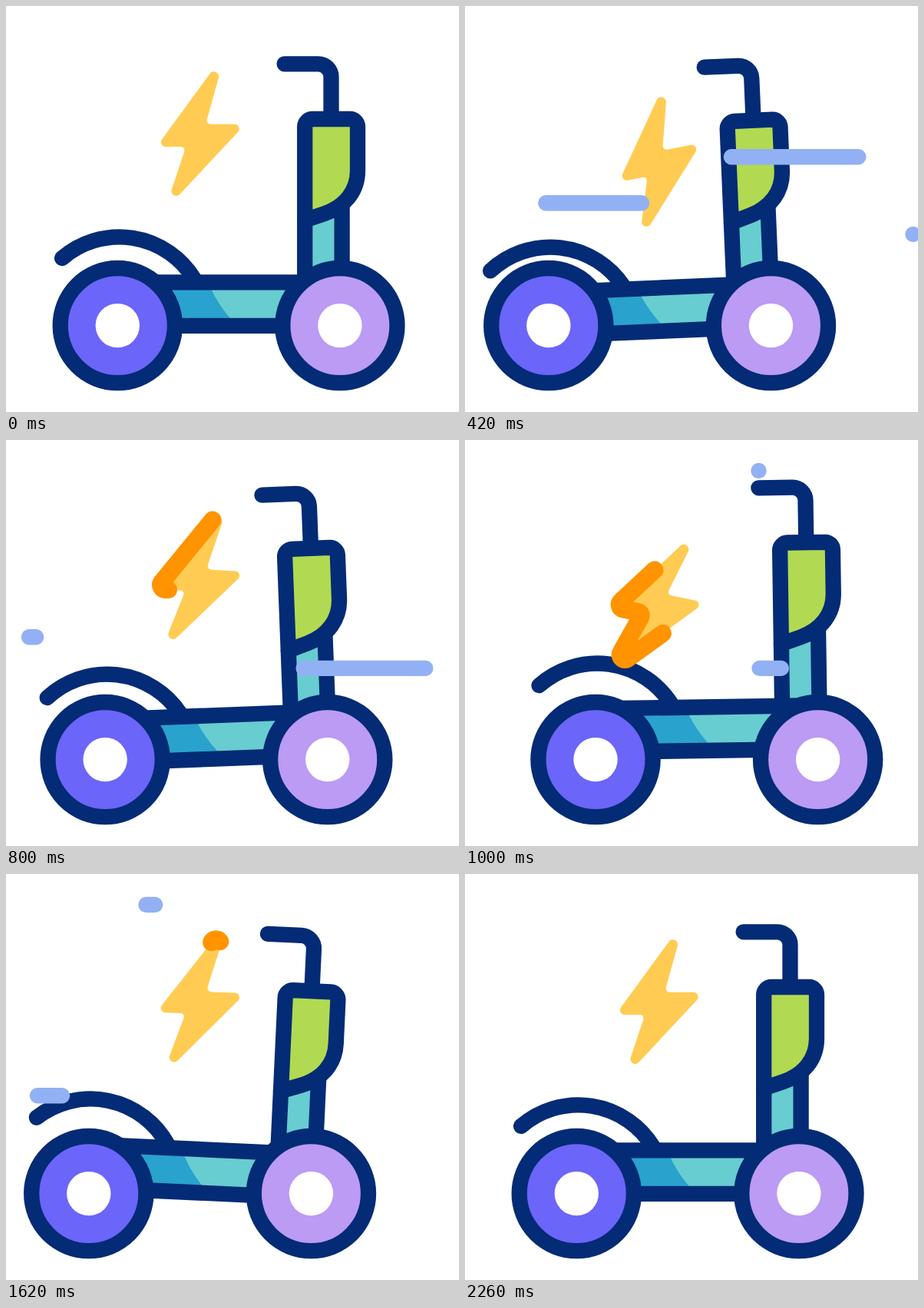
An HTML page for the animation above (2.4 s loop, 590 by 528 pixels).

```html
<!DOCTYPE html>
<html lang="en">
<head>
<meta charset="utf-8">
<title>Electric scooter</title>
<style>
  html, body { margin: 0; width: 100%; height: 100%; overflow: hidden; background: #fff; }
  svg { display: block; width: 590px; height: 528px; }
  .line { fill: none; stroke: #042b75; stroke-width: 20.3; stroke-linejoin: round; }
  .cap { stroke-linecap: round; }
  .streak { fill: none; stroke: #92b0f4; stroke-width: 20.4; stroke-linecap: round; }
</style>
</head>
<body>
<svg viewBox="0 0 590 528">
  <g id="body">
    <path fill="#67cdd0" d="M160 359H435V416H160ZM389 262H438V360H389Z"/>
    <path fill="#29a2ce" d="M160 359H263.5Q273 386 300.5 416H160Z"/>
    <path class="line" d="M160 359.3H435V415.8H160Z"/>
    <path class="line cap" d="M73 328A114.4 114.4 0 0 1 245.1 355"/>
    <path class="line" d="M389.2 278V358M437.6 258V400"/>
    <path class="line cap" d="M362.6 75.3H406.5A17 17 0 0 1 423.5 92.3V147"/>
    <path class="line" style="fill:#b1da52" d="M389.2 278.6V157A10 10 0 0 1 399.2 147H448A10 10 0 0 1 458 157V214C458 241 441 261 415 270Z"/>
  </g>
  <g id="wheels">
    <g transform="translate(145.3 415.6)">
      <circle class="line" r="74.6" style="fill:#6b65f9"/>
      <circle r="28.7" fill="#fff"/>
    </g>
    <g transform="translate(434.9 415.6)">
      <circle class="line" r="74.6" style="fill:#bb9bf3"/>
      <circle r="28.7" fill="#fff"/>
    </g>
  </g>
  <g id="bolt">
    <path id="flash" fill="#ffcb52"/>
    <path id="glow" fill="none" stroke="#ff9300" stroke-width="23" stroke-linecap="round" stroke-linejoin="round" pathLength="1"/>
  </g>
  <g id="streaks"></g>
</svg>
<script>
const LOOP = 2400, STEP = 20, BEAT = 323;
const STREAK = { length: 200, run: 410, delay: 262 };
const $ = id => document.getElementById(id);

const outline = 'M264.6 89.2L203.1 173.6A6 6 0 0 0 208 183H227' +
  'Q234 183 232 190L216 238A6.3 6.3 0 0 0 226.6 244.6' +
  'L302 163.9A6 6 0 0 0 297.6 153.8H268Q260 153.8 262.2 146' +
  'L276.6 94.2A6.5 6.5 0 0 0 264.6 89.2';
$('flash').setAttribute('d', outline + 'Z');
$('glow').setAttribute('d', outline);

function ease(u) {
  u = Math.min(1, Math.max(0, u));
  return u * u * (3 - 2 * u);
}

// Eases from each value to the next; without times, one value per beat.
function track(values, times = values.map((_, i) => i * BEAT)) {
  return t => values.slice(1).reduce((sum, v, i) =>
    sum + (v - values[i]) * ease((t - times[i]) / (times[i + 1] - times[i])), values[0]);
}

const ride = track([0, -45.2, 33, -37.5, 0], [0, 585, 1105, 1615, 2200]);
const tilt = track([0, -2.9, 2.68, 0], [0, 565, 1620, 2240]);
const bob = track([0, 6.8, 8.5, -12.4, 5.2, -1.2, -3, 0]);
const boltDrop = track([0, 49, -14.6, 47, 4.5, -1, 0]);
const boltTilt = track([0, -13.2, -3.9, 11.5, -7, 2.2, 0]);

function makeStreak(right, y, start) {
  const path = document.createElementNS('http://www.w3.org/2000/svg', 'path');
  path.setAttribute('class', 'streak');
  $('streaks').appendChild(path);
  const { length, run, delay } = STREAK;
  const end = delay => t => right - length * ease((t - start - delay) / run);
  const head = end(0), tail = end(delay);
  return t => {
    show(path, t > start - STEP && t < start + delay + run);
    path.setAttribute('d', `M${head(t)} ${y}H${tail(t) + 0.01}`);
  };
}

const streaks = [
  makeStreak(527, 196.2, 90),
  makeStreak(230, 256.2, 181),
  makeStreak(583.5, 296.9, 425),
  makeStreak(382.5, 40, 1008),
  makeStreak(241, 288.2, 1052)
];

function show(el, on) {
  el.setAttribute('visibility', on ? 'visible' : 'hidden');
}

function place(id, x, y, angle = 0, pivot = '') {
  $(id).setAttribute('transform', `translate(${x} ${y}) rotate(${angle} ${pivot})`);
}

function draw(t) {
  place('wheels', ride(t), 0);
  place('body', ride(t), bob(t), tilt(t), '290 415');
  place('bolt', 0, boltDrop(t), boltTilt(t), '253 168');

  const head = ease((t - 498) / 890), tail = ease((t - 830) / 880);
  show($('glow'), head > tail);
  $('glow').setAttribute('stroke-dasharray', `${head - tail} 2`);
  $('glow').setAttribute('stroke-dashoffset', -tail);

  streaks.forEach(update => update(t));
}

const begin = performance.now();
function tick() {
  const t = (performance.now() - begin) % LOOP;
  draw(Math.floor(t / STEP) * STEP);
  requestAnimationFrame(tick);
}
tick();
</script>
</body>
</html>
```
